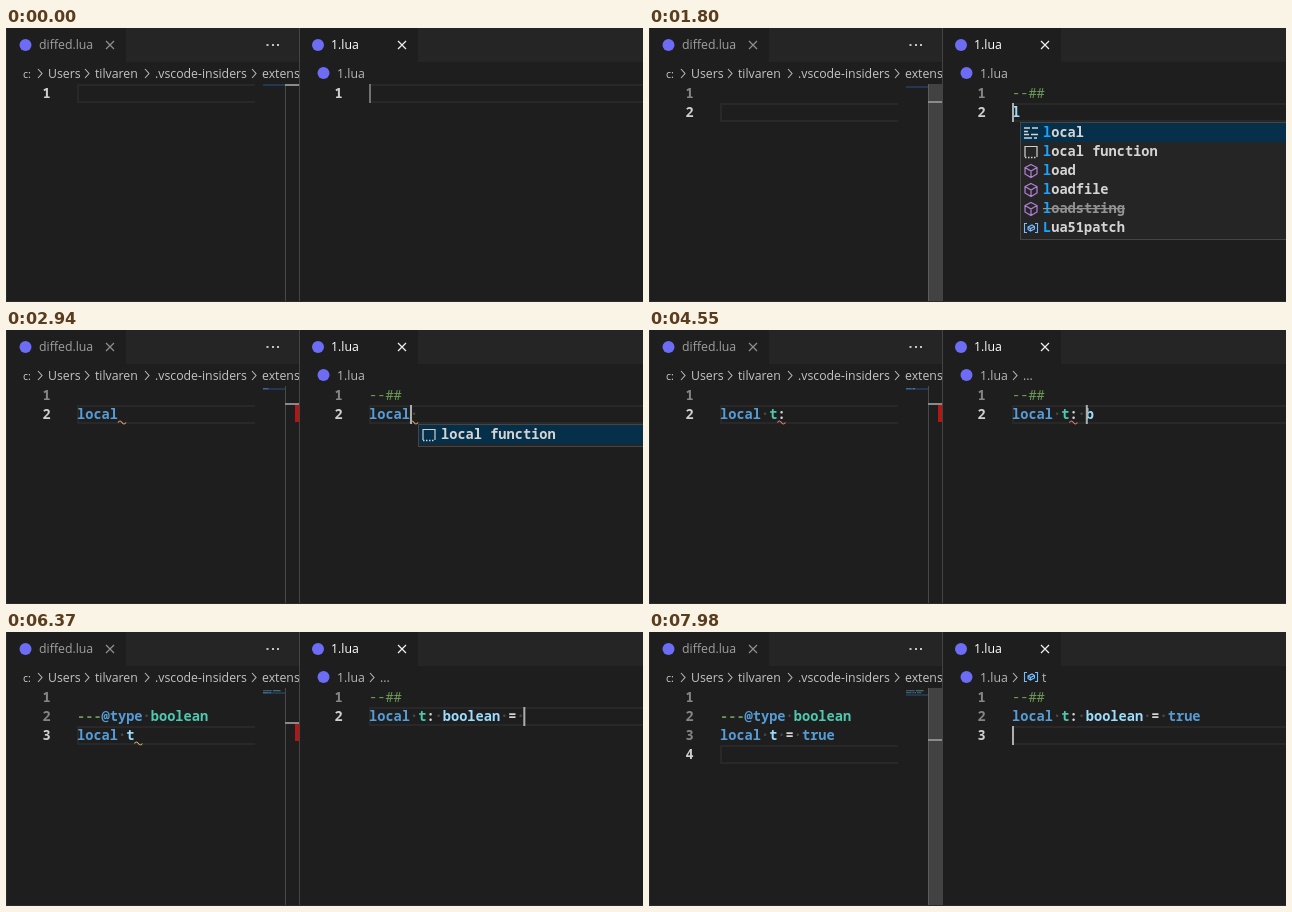
Recreate the animation shown at these times as an HTML page. Size 637 px wide and 274 px high, loop 8 s.

```html
<!DOCTYPE html>
<html lang="en">
<head>
<meta charset="utf-8">
<title>Lua editors side by side</title>
<style>
  html, body { margin: 0; width: 100%; height: 100%; overflow: hidden; background: #1e1e1e; }
  svg { display: block; }
  text { white-space: pre; }
  .ui { font: 12.3px "Open Sans", "Noto Sans", sans-serif; }
  .drive { font: 10.5px "Open Sans", "Noto Sans", sans-serif; }
  .code { font: 600 13.67px "Noto Sans Mono", "DejaVu Sans Mono", monospace; }
  .thin { font-weight: 400; }
  .abc { font: 700 9.5px "Open Sans", sans-serif; }
</style>
</head>
<body>
<svg id="stage" width="637" height="274" viewBox="0 0 637 274"></svg>
<script>
const LOOP = 8000, TOP = 56, ROW = 19, CH = 8.2, LEFT = 71, RIGHT = 363;
const COLORS = { green: '#6a9955', blue: '#569cd6', teal: '#4ec9b0', ident: '#9cdcfe', dot: '#484848', plain: '#d4d4d4' };
const TOKEN = /(?<green>-+#*)|(?<blue>\b(?:local|true)\b|@type)|(?<teal>(?<=@type )\w+|\bt(?=:))|(?<ident>\w+)|(?<dot> )|(?<plain>.)/g;

// Every track is a list of [start time, value].
const keys = [
  [0, ''], [50, '-'], [300, '-'], [880, '#'], [1040, '#'], [1440, '\n'],
  [1800, 'l'], [1930, 'o'], [2080, 'c'], [2270, 'a'], [2420, 'l'], [2940, ' '],
  [3530, 't'], [4000, ':'], [4370, ' '], [4550, 'b'], [4720, 'o'], [4870, 'o'], [5070, 'l'],
  [5430, 'e'], [5550, 'a'], [5660, 'n'], [5910, ' '], [6150, '='], [6300, ' '],
  [6880, 't'], [7060, 'r'], [7200, 'u'], [7320, 'e'], [7670, '\n']
];
const output = [
  [0, ''], [1700, '\n'], [2640, '\nlocal'], [3150, '\nlocal '], [3760, '\nlocal t'], [4200, '\nlocal t:'],
  [5120, '\n---@type bool\nlocal t'],
  [5700, '\n---@type boole\nlocal t'], [5990, '\n---@type boolean\nlocal t'],
  [6480, '\n---@type boolean\nlocal t = '], [7480, '\n---@type boolean\nlocal t = true'],
  [7850, '\n---@type boolean\nlocal t = true\n']
];
// Squiggles: [line, column, colour]
const inputMarks = [[0], [2700, [1, 5, '#e0a070']], [3530], [4200, [1, 7, '#e08070']], [5120]];
const outputMarks = [
  [0], [2640, [1, 5, '#e0a070']], [3760], [4200, [1, 7, '#e08070']], [5120, [2, 7, '#d0b060']],
  [6480, [2, 10, '#b0b0b0']], [7480]
];
const sliderTimes = [1740, 5190, 7880];
const symbol = [[0, ''], [3760, '...'], [7850, 't']];
// Suggestion lists: [line, column, matched letters, items as kind:label]
const words = ['k:true', 'a:trade_limit', 'a:trailing', 'a:traceback', 'a:trans', 'a:transform', 'a:tryget', 'a:trigger_free', 'a:tryDebugger', 'a:tracy'];
const locals = ['k:local', 's:local function'];
const loads = ['f:load', 'f:loadfile', 'd:loadstring'];
const lists = [
  [0], [300, [0, 2, 0, ['s:#region', 's:#endregion']]], [900],
  [1800, [1, 1, 1, [...locals, ...loads, 'v:Lua51patch']]],
  [1930, [1, 1, 2, [...locals, ...loads]]], [2080, [1, 1, 3, locals]], [2270, [1, 1, 4, locals]],
  [2420, [1, 1, 5, locals]], [2940, [1, 6, 0, ['s:local function']]], [3530],
  [7060, [1, 21, 2, words]], [7200, [1, 21, 3, ['k:true']]], [7320, [1, 21, 4, ['k:true']]], [7500]
];

const at = (track, t) => track.findLast(([start]) => start <= t)[1];
const clamp = v => Math.max(0, Math.min(1, v));
const rect = (x, y, w, h, fill, more = '') => `<rect x="${x}" y="${y}" width="${w}" height="${h}" fill="${fill}" ${more}/>`;
const path = (d, stroke, more = '') => `<path d="${d}" fill="none" stroke="${stroke}" ${more}/>`;
const text = (x, y, s, fill, cls = 'ui') => `<text x="${x}" y="${y}" fill="${fill}" class="${cls}">${s}</text>`;
const ball = (x, y) => `<circle cx="${x}" cy="${y}" r="6" fill="#6c6cf5"/>`;
const cross = (x, y, color) => path(`M${x - 4} ${y - 4}l8 8m0-8l-8 8`, color, 'stroke-width="1.2"');
const chevron = x => path(`M${x - 2} 41l4 4.5l-4 4.5`, '#b8b8b8', 'stroke-width="1.1"');
const tokens = line => [...line.matchAll(TOKEN)].map(m => {
  const kind = Object.keys(m.groups).find(k => m.groups[k]);
  return { s: m[0], kind, col: m.index };
});

function codeLine(x, y, line) {
  const spans = tokens(line).map(({ s, kind }) =>
    `<tspan fill="${COLORS[kind]}"${s.includes('#') ? ' class="thin"' : ''}>${kind === 'dot' ? '·' : s}</tspan>`);
  return `<text x="${x}" y="${y}" class="code">${spans.join('')}</text>`;
}

function editor(x, end, content, mark) {
  const lines = content.split('\n'), last = lines.length - 1, y = TOP + last * ROW + 1;
  let out = path(`M${end} ${y}H${x + 1}v${ROW - 2}H${end}`, '#282828', 'stroke-width="2"');
  lines.forEach((line, i) => {
    const base = TOP + i * ROW + 14;
    out += text(x - 34.5, base, i + 1, i === last ? '#d0d0d0' : '#858585', 'code') + codeLine(x, base, line);
  });
  if (mark) {
    const [row, col, color] = mark;
    out += path(`M${x + col * CH} ${TOP + row * ROW + 17.5}q2-3 4 0t4 0`, color, 'stroke-width="1.1"');
  }
  return out;
}

function minimap(content) {
  const lines = content.split('\n');
  let out = rect(257, TOP + 2 * (lines.length - 1), 22, 2, '#253653');
  lines.forEach((line, i) => tokens(line).forEach(({ s, kind, col }) => {
    if (kind !== 'dot') out += rect(257 + col * 1.1, TOP + 2 * i, s.length * 1.1, 1.3, COLORS[kind], 'opacity=".5"');
  }));
  return out;
}

const cube = path('M8 1.5L14 4.5V11L8 14.5L2 11V4.5ZM2 4.5L8 8L14 4.5M8 8V14.5', '#b180d7', 'stroke-width="1.2"');
const ICONS = {
  k: path('M1 3h6m2 0h6M1 6.500h4M8 9.500h7M1 9.500h5M1 13h8m2 0h3', '#d4d4d4', 'stroke-width="1.6"'),
  s: path('M2 13V2.5H14V13', '#d0d0d0', 'stroke-width="1.2"') + path('M2 13.5H14', '#d0d0d0', 'stroke-width="1.3" stroke-dasharray="1.5 1.5"'),
  f: cube,
  d: cube,
  v: path('M4 3.5H1.5V12.5H4M12 3.5H14.5V12.5H12M5 7l4-2l2.5 1.5v2.5l-4 2l-2.5-1.5zm0 0l2.5 1.5l4-2m-4 2v2.5', '#75beff', 'stroke-width="1.1"'),
  a: text(0, 11, 'abc', '#d4d4d4', 'abc')
};
const icon = (kind, x, y) => `<g transform="translate(${x} ${y})">${ICONS[kind]}</g>`;

function suggestions([row, col, hit, items]) {
  const x = Math.round(RIGHT + col * CH), y = TOP + (row + 1) * ROW;
  let out = rect(x + .5, y + .5, 400, items.length * ROW + 3, '#252526', 'stroke="#454545"');
  items.forEach((item, i) => {
    const [kind, label] = item.split(':'), top = y + 1 + i * ROW, old = kind === 'd';
    if (!i) out += rect(x + 1, top, 400, ROW, '#062f4a');
    out += icon(kind, x + 3, top + 2);
    out += text(x + 23, top + 14, `<tspan fill="#18a3ff">${label.slice(0, hit)}</tspan>${label.slice(hit)}`, old ? '#929292' : '#d4d4d4', 'code');
    if (old) out += rect(x + 23, top + 9, label.length * CH, 1.2, '#929292');
  });
  return out;
}

const typed = n => keys.slice(0, n + 1).map(k => k[1]).join('');
function spot(s) {
  const lines = s.split('\n');
  return [RIGHT + lines.at(-1).length * CH, TOP + (lines.length - 1) * ROW];
}

// The caret glides to its new place after each key.
function caret(t, n) {
  const to = spot(typed(n)), from = n ? spot(typed(n - 1)) : to;
  const p = 1 - (1 - clamp((t - keys[n][0] - 25) / 80)) ** 2;
  const [x, y] = to.map((v, i) => from[i] + (v - from[i]) * p);
  return rect(x, y, 2, ROW, '#aeafad', `opacity="${t < 50 ? .55 : 1}"`);
}

// The slider shows briefly whenever the line count changes.
function ruler(t, content) {
  const mark = at(outputMarks, t), shown = sliderTimes.findLast(s => s <= t);
  const slider = shown ? clamp((shown + 560 - t) / 150) : 0;
  let out = rect(279, TOP, 1, 218, '#484848');
  if (mark) out += rect(289, 58 + mark[0] * 17, 4, 17, '#b01818');
  out += rect(279, TOP, 14, 218, '#797979', `opacity="${slider * .4}"`);
  return out + rect(279, TOP + 17 * (content.split('\n').length - 1), 14, 2, '#8a8a8a');
}

const leftFrame = rect(0, 0, 637, 274, '#1e1e1e') + rect(120, 0, 173, 34, '#252526') + rect(0, 0, 1, 274, '#2b2b2b') +
  ball(19.5, 17) + text(33, 21, 'diffed.lua', '#a0a0a0') + cross(104, 17, '#8f8f8f') +
  [261.5, 267, 272].map(x => rect(x - 1, 16, 2, 2, '#c5c5c5')).join('') +
  text(17, 50, 'c:', '#d0d0d0', 'drive') +
  [[42, 'Users'], [89, 'tilvaren'], [149, '.vscode-insiders'], [256, 'extensions']].map(([x, s]) => text(x, 50, s, '#c4c4c4')).join('') +
  [34, 81, 141, 248].map(chevron).join('');
const rightFrame = rect(293, 0, 344, 274, '#1e1e1e') + rect(412, 0, 225, 34, '#252526') + rect(293, 0, 1, 274, '#444') +
  ball(312, 17) + text(325, 21, '1.lua', '#fff') + cross(396, 17, '#f0f0f0') +
  ball(317.5, 45) + text(331, 50, '1.lua', '#b8b8b8');

function crumb(name) {
  if (!name) return '';
  if (name === '...') return chevron(366) + text(374, 50, name, '#b8b8b8');
  return chevron(366) + icon('v', 374, 37) + text(393, 50, name, '#b8b8b8');
}

const stage = document.getElementById('stage');
function draw(t) {
  const n = keys.findLastIndex(k => k[0] <= t), result = at(output, t), list = at(lists, t);
  stage.innerHTML = leftFrame + editor(LEFT, 249, result, at(outputMarks, t)) + minimap(result) + ruler(t, result) +
    rightFrame + crumb(at(symbol, t)) + editor(RIGHT, 637, typed(n), at(inputMarks, t)) + caret(t, n) +
    (list ? suggestions(list) : '') + rect(0, 273, 637, 1, '#2c2c2d');
}

const start = performance.now();
function tick() {
  draw((performance.now() - start) % LOOP);
  requestAnimationFrame(tick);
}
tick();
</script>
</body>
</html>
```
